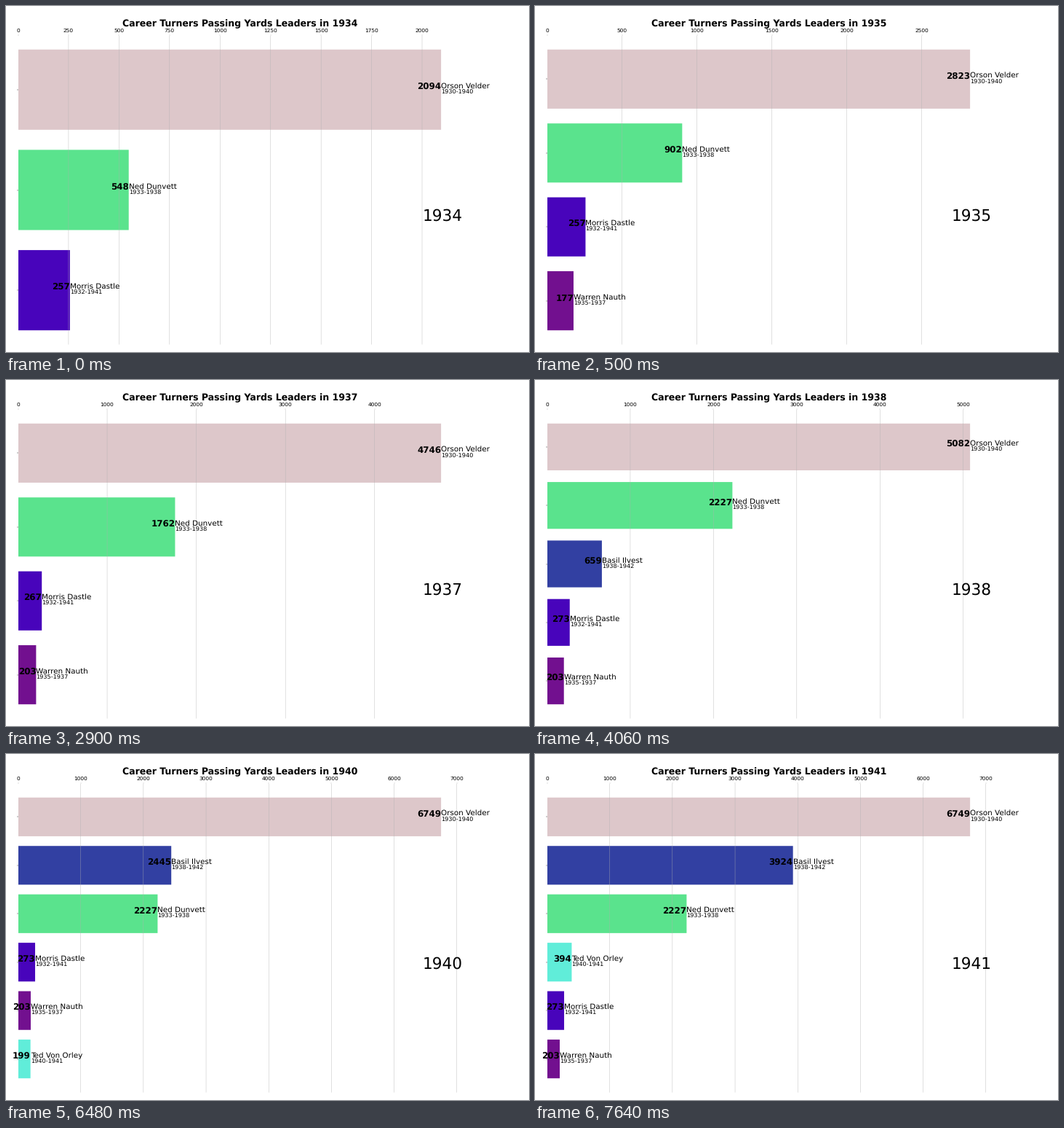
Recreate the animation shown at these times as a matplotlib script. Size 719x475 px, loop 8000 ms.

```python
import matplotlib.pyplot as plt
from matplotlib.animation import FuncAnimation

WIDTH, HEIGHT, DPI = 719, 475, 100
STEP, LOOP = 20, 8000
LEFT, RIGHT, TOP, BOTTOM = 16.5, 627.2, 40.5, 464.5

# name: (active years, bar colour)
PLAYERS = {
    "Orson Velder": ("1930-1940", "#ddc7ca"),
    "Ned Dunvett": ("1933-1938", "#5ae38d"),
    "Morris Dastle": ("1932-1941", "#4804bb"),
    "Warren Nauth": ("1935-1937", "#72108f"),
    "Basil Ilvest": ("1938-1942", "#3240a2"),
    "Ted Von Orley": ("1940-1941", "#60edd9"),
}

# (start in ms, year, career yards in the order of PLAYERS)
SEASONS = [
    (0, 1934, (2094, 548, 257)),
    (500, 1935, (2823, 902, 257, 177)),
    (1740, 1936, (4062, 1182, 257, 203)),
    (2900, 1937, (4746, 1762, 267, 203)),
    (4060, 1938, (5082, 2227, 273, 203, 659)),
    (5300, 1939, (6189, 2227, 273, 203, 1408)),
    (6480, 1940, (6749, 2227, 273, 203, 2445, 199)),
    (7640, 1941, (6749, 2227, 273, 203, 3924, 394)),
]


def px(size):
    """Convert pixels to points."""
    return size * 72 / DPI


plt.rcParams.update({"font.family": "DejaVu Sans", "text.hinting": "none"})
fig = plt.figure(figsize=(WIDTH / DPI, HEIGHT / DPI), dpi=DPI, facecolor="white")


def build_chart(year, yards):
    ax = fig.add_axes([LEFT / WIDTH, 1 - BOTTOM / HEIGHT,
                       (RIGHT - LEFT) / WIDTH, (BOTTOM - TOP) / HEIGHT],
                      label=str(year))
    ranking = sorted(zip(yards, PLAYERS), key=lambda item: item[0])
    for row, (value, name) in enumerate(ranking):
        span, color = PLAYERS[name]
        ax.barh(row, value, 0.8, color=color, snap=False)
        ax.text(value, row, str(value), size=px(11.86), weight="bold",
                ha="right", va="baseline")
        ax.text(value, row, name, size=px(10.35), ha="left", va="bottom")
        ax.text(value, row, span, size=px(8.1), ha="left", va="top")

    top = len(ranking) - 0.6
    margin = 0.05 * (top + 0.4)
    ax.set_ylim(-0.4 - margin, top + margin)
    ax.set_xlim(0, max(yards) * 1.05)
    step = next(s for s in (250, 500, 1000) if max(yards) * 1.05 / s <= 9)
    ax.set_xticks(range(0, int(max(yards) * 1.05) + 1, step))
    ax.set_yticks(range(len(ranking)), [""] * len(ranking))
    ax.xaxis.tick_top()
    ax.tick_params(length=px(1.64), width=px(0.38), pad=px(1.64),
                   labelsize=px(7.4))
    ax.tick_params(axis="x", color="#b0b0b0")
    ax.grid(axis="x", color="#b0b0b0", linewidth=px(0.38), snap=False)
    ax.spines[:].set_visible(False)
    ax.patch.set_visible(False)

    ax.text(1, 0.4, str(year), transform=ax.transAxes, size=px(21.6),
            ha="right", va="baseline")
    fig.text((LEFT + RIGHT) / 2 / WIDTH, 1 - 28 / HEIGHT,
             f"Career Turners Passing Yards Leaders in {year}",
             size=px(12.55), weight="bold", ha="center", va="baseline",
             gid=str(year))
    return ax


charts = [build_chart(year, yards) for _, year, yards in SEASONS]
titles = list(fig.texts)


def update(frame):
    now = frame * STEP
    current = sum(start <= now for start, _, _ in SEASONS) - 1
    for i, artists in enumerate(zip(charts, titles)):
        for artist in artists:
            artist.set_visible(i == current)
    return []


animation = FuncAnimation(fig, update, frames=LOOP // STEP, interval=STEP,
                          repeat=True, repeat_delay=0)
plt.show()
```
